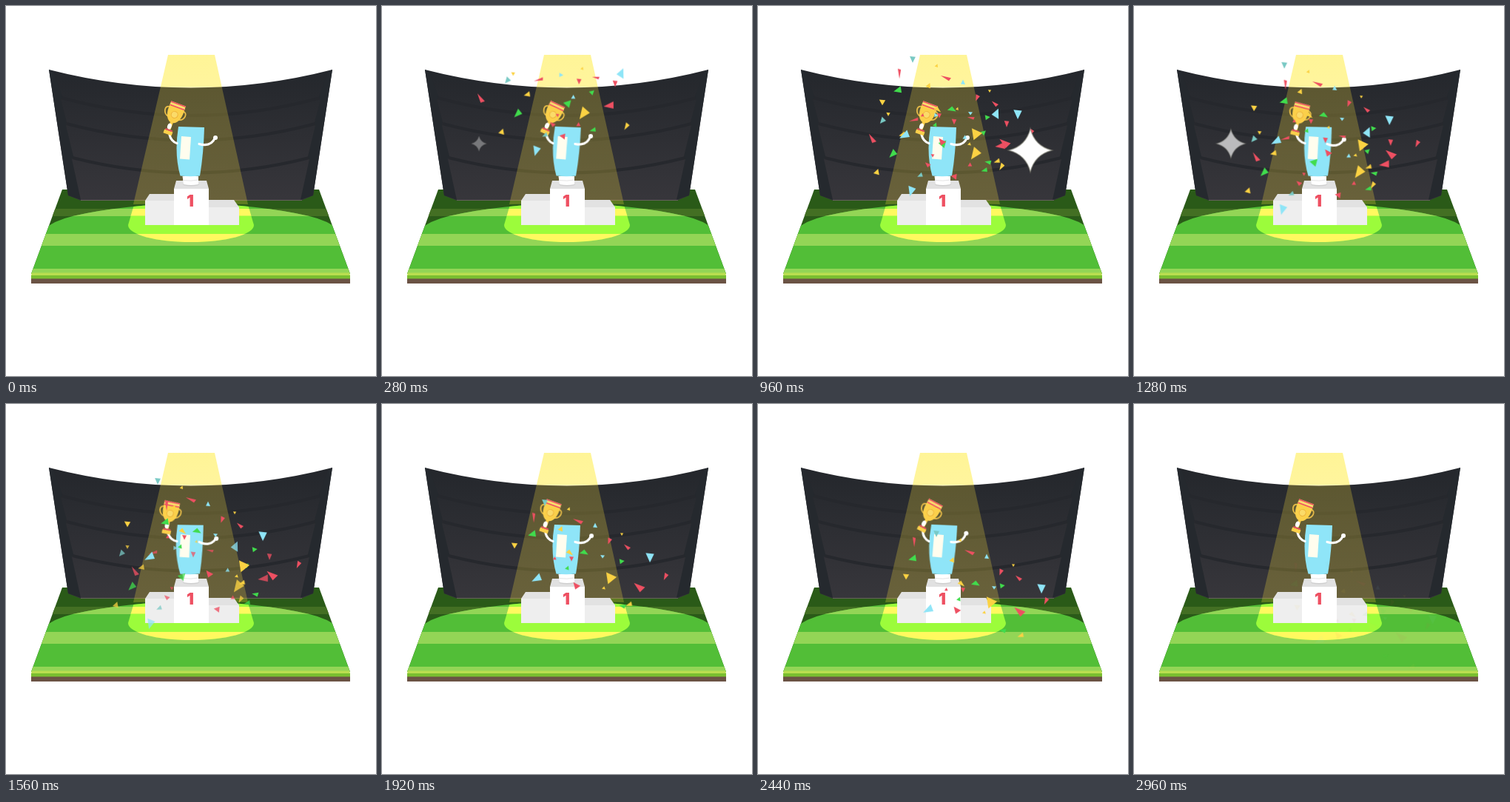
These frames come from a looping animation (500x500 px, 3000 ms). An HTML page without scripts:

```html
<!DOCTYPE html>
<html lang="en">
<head>
<meta charset="utf-8">
<title>Winner's podium</title>
<style>
html, body { margin: 0; width: 100%; height: 100%; overflow: hidden; background: #fff; }
svg { display: block; width: 100%; height: 100%; }
.r { fill: #ee5062; }
.y { fill: #fbd243; }
.g { fill: #41dc4d; }
.b { fill: #8fe5f7; }
.t { fill: #79c9c4; }

.sway { animation: 3s ease-in-out infinite; }
.body { animation-name: lean; transform-origin: 249px 232px; }
.left { animation-name: wave; transform-origin: 231px 186px; }
.right { animation-name: lift; transform-origin: 261px 187px; }
@keyframes lean {
  0%, 33.3%, 66.7%, 100% { transform: none; }
  16.7%, 83.3% { transform: rotate(1.1deg); }
  50% { transform: rotate(-1.1deg); }
}
@keyframes wave {
  0%, 33.3%, 66.7%, 100% { transform: none; }
  16.7%, 83.3% { transform: rotate(8deg); }
  50% { transform: rotate(-9deg); }
}
@keyframes lift {
  0%, 33.3%, 66.7%, 100% { transform: none; }
  16.7%, 83.3% { transform: rotate(-9deg); }
  50% { transform: rotate(10deg); }
}

/* confetti: pop out of the middle, then drift down in two currents */
.burst { animation: 3s linear infinite; transform-origin: 250px 175px; }
.a1 { animation-name: a1; }
.b1 { animation-name: b1; }
.a2 { animation-name: a2; }
.b2 { animation-name: b2; }
@keyframes a1 {
  0%, 1% { transform: scale(0); opacity: 1; animation-timing-function: ease-out; }
  7% { transform: translate(-10px, -28px); }
  18.67% { transform: none; }
  32% { transform: translate(13px, 32px); }
  48% { opacity: 1; }
  52% { transform: translate(33px, 79px); opacity: .8; }
  62%, 100% { transform: translate(44px, 103px); opacity: 0; }
}
@keyframes b1 {
  0%, 1% { transform: scale(0); opacity: 1; animation-timing-function: ease-out; }
  7% { transform: translate(4px, -28px); }
  18.67% { transform: none; }
  32% { transform: translate(2px, 32px); }
  48% { opacity: 1; }
  52% { transform: translate(-10px, 79px); opacity: .75; }
  62%, 100% { transform: translate(-16px, 103px); opacity: 0; }
}
@keyframes a2 {
  0%, 20% { transform: translate(0, -20px) scale(0); animation-timing-function: ease-out; }
  32% { transform: translate(-11px, -61px); }
  37% { transform: translate(-18px, -68px); }
  52% { transform: translate(-15px, -29px); }
  64% { transform: none; }
  81.33% { transform: translate(21px, 42px); }
  85% { opacity: 1; }
  98.67% { opacity: .06; }
  100% { transform: translate(43px, 87px); opacity: 0; }
}
@keyframes b2 {
  0%, 20% { transform: translate(0, -20px) scale(0); animation-timing-function: ease-out; }
  32% { transform: translate(-14px, -62px); }
  37% { transform: translate(-8px, -66px); }
  52% { transform: translate(12px, -16px); }
  64% { transform: none; }
  81.33% { transform: translate(6px, 33px); }
  85% { opacity: 1; }
  98.67% { opacity: .06; }
  100% { transform: translate(14px, 70px); opacity: 0; }
}

.star { fill: #fff; stroke: #8a8a7c; stroke-opacity: .55; stroke-width: 1.5; animation: 3s ease-in-out infinite; }
.east { animation-name: east; }
.west { animation-name: west; }
@keyframes east {
  0%, .7%, 7.3%, 28.7%, 35.3%, 56.7%, 63.3%, 84.7%, 91.3%, 100% { transform: scale(0); opacity: 0; }
  4%, 32%, 60%, 88% { transform: none; opacity: 1; }
}
@keyframes west {
  0%, 8%, 14.6%, 40.7%, 47.3%, 74.4%, 81%, 100% { transform: scale(0); opacity: 0; }
  11.3%, 44%, 77.7% { transform: none; opacity: 1; }
}
</style>
</head>
<body>
<svg viewBox="0 0 500 500">
<defs>
  <path id="tri" d="M-6-5 6-4 0 6z"/>
  <path id="spark" d="M0-29Q6-6 29 0 6 6 0 29-6 6-29 0-6-6 0-29z"/>
  <linearGradient id="wall" x2="0" y2="1">
    <stop stop-color="#24272c"/><stop offset="1" stop-color="#37363b"/>
  </linearGradient>
  <linearGradient id="beam" gradientUnits="userSpaceOnUse" x1="0" y1="66" x2="0" y2="266">
    <stop stop-color="#ffeb3b" stop-opacity=".53"/>
    <stop offset=".217" stop-color="#ffeb3b" stop-opacity=".5"/>
    <stop offset=".218" stop-color="#ffe33b" stop-opacity=".25"/>
    <stop offset="1" stop-color="#ffe33b" stop-opacity=".25"/>
  </linearGradient>
  <clipPath id="field"><path d="M76 248H423L465 362H34z"/></clipPath>
  <clipPath id="lit"><path d="M0 375V303H50Q64 290 90 284 160 268 250 267 340 268 410 284 436 290 450 303H500V375z"/></clipPath>
  <clipPath id="pool"><path d="M175 262H325L335 296C335 309 297 319 250 319S165 309 165 296z"/></clipPath>
</defs>

<g clip-path="url(#field)">
  <path fill="#2a5a18" d="M0 248H500V362H0z"/>
  <path fill="#436f23" d="M0 274H500V284H0z"/>
  <g clip-path="url(#lit)">
    <path fill="#52be37" d="M0 260H500V362H0z"/>
    <path fill="#93d556" d="M0 274H500V284H0zM0 308H500V324H0zM0 355H500V362H0z"/>
    <g clip-path="url(#pool)">
      <path fill="#9cfc3b" d="M150 260H350V320H150z"/>
      <path fill="#fff95f" d="M150 274H350V283.500H150zM150 308H350V320H150z"/>
    </g>
  </g>
</g>
<path fill="#bade50" d="M35 360.500H464L465 364H34z"/>
<path fill="#7abf30" d="M34 364H465V369H34z"/>
<path fill="#6b5344" d="M34 368.500H465V375H34z"/>

<path fill="url(#wall)" d="M58 86Q250 135 441 86L415 256 400 262.500H100L84 256z"/>
<g fill="none" stroke="#26282d" stroke-width="4">
  <path d="M75 124Q250 172 425 124"/>
  <path d="M82 159Q250 204 418 159"/>
  <path d="M90 205Q250 246 410 205"/>
</g>
<path id="side" fill="#25292e" d="M58 86 64 89 76 122 74 127 82 157 81 162 91 203 89 207 101 262 84 256z"/>
<use href="#side" transform="matrix(-1 0 0 1 499 0)"/>
<path fill="none" stroke="#66625c" d="M101 262.500H400"/>
<path fill="url(#beam)" d="M219 66H282L327 268Q250 266 172 268z"/>

<path fill="#e2e2e2" d="M194 254H228V263H188zM274 262H308L315 272H274z"/>
<path fill="#eee" d="M188 263H228V296H188zM273 272H315V296H273z"/>
<path fill="#e1e1e1" d="M230 236H271L274 247H227z"/>
<path fill="#fff" d="M227 247H274V296H227z"/>
<text x="249" y="271" text-anchor="middle" font-family="Inter, Arial, sans-serif" font-weight="900" font-size="22" fill="#ee5062">1</text>
<ellipse cx="250" cy="241" rx="11" ry="2.500" fill="#cfcfcf"/>
<path fill="#fff" d="M238.500 230H260L260 241Q250 243 240 241z"/>
<path fill="none" stroke="#e4e4e4" d="M239 235.500Q250 237 260 235"/>

<g class="sway body">
  <path fill="#8fe5f8" d="M233 163 268 164Q267 200 262 229.500 249 231 235.500 229.500 227 200 233 163z"/>
  <path fill="#fffdee" d="M237 176 250 177 248 207.500 235 206.500z"/>
</g>
<g class="sway left">
  <path fill="none" stroke="#fff" stroke-width="3.200" stroke-linecap="round" d="M231 185.500Q223 183 221 174"/>
  <g transform="translate(228 146) rotate(20)">
    <g fill="none" stroke="#e9bd48" stroke-width="1.800">
      <path d="M-9-7C-17-8-16 4-7 6M9-7C17-8 16 4 7 6"/>
    </g>
    <path fill="#fbd04b" d="M-10.500-11H10.500Q12 7 3 12H-3Q-12 7-10.500-11zM-2 11H2V22H-2zM-6 24H6V29H-6z"/>
    <path fill="#fbdc6d" d="M-10.500-15H10.500V-10H-10.500z"/>
    <path fill="#ee5062" d="M-10.500-15H10.500V-13.500H-10.500zM-10.500-10.500H10.500V-9H-10.500zM-5 22H5V24H-5z"/>
    <circle cy="1" r="4.500" fill="#fbdb69" stroke="#eeb33c"/>
    <ellipse cx="-1" cy="18" rx="2.800" ry="4" fill="#fff"/>
  </g>
</g>
<g class="sway right">
  <path fill="none" stroke="#fff" stroke-width="3.200" stroke-linecap="round" d="M261 186.500Q277 191 282.500 178"/>
  <circle cx="283" cy="178" r="3" fill="#fff"/>
</g>

<g class="burst a1">
  <g class="r">
    <use href="#tri" transform="translate(141 147) rotate(148) scale(.5 1.300)"/>
    <use href="#tri" transform="translate(315 157) rotate(82) scale(.8 1.300)"/>
    <use href="#tri" transform="translate(323 127) scale(.55 .8)"/>
    <use href="#tri" transform="translate(253 199) rotate(-25) scale(.7)"/>
    <use href="#tri" transform="translate(273 183) rotate(60) scale(.5)"/>
  </g>
  <use class="y" href="#tri" transform="translate(280 168) rotate(35) scale(1.100 1.500)"/>
  <g class="g">
    <use href="#tri" transform="translate(293 190) rotate(75) scale(.5 .8)"/>
    <use href="#tri" transform="translate(291 139) rotate(105) scale(.6)"/>
  </g>
  <use class="b" href="#tri" transform="translate(266 146) rotate(60) scale(.5)"/>
</g>

<g class="burst b1">
  <g class="r">
    <use href="#tri" transform="translate(209 122) rotate(75) scale(.35 1.200)"/>
    <use href="#tri" transform="translate(263 124) scale(.55 .7)"/>
    <use href="#tri" transform="translate(286 119) rotate(100) scale(.3 .9)"/>
    <use href="#tri" transform="translate(227 182) rotate(130) scale(.5 .7)"/>
    <use href="#tri" transform="translate(234 170) scale(.4)"/>
  </g>
  <g class="y">
    <use href="#tri" transform="translate(174 114) scale(.45)"/>
    <use href="#tri" transform="translate(193 142) rotate(75) scale(.6 .8)"/>
    <use href="#tri" transform="translate(158 193) rotate(75) scale(.7)"/>
    <use href="#tri" transform="translate(327 185) rotate(30) scale(.5 .9)"/>
    <use href="#tri" transform="translate(267 107) rotate(75) scale(.35)"/>
  </g>
  <g class="g">
    <use href="#tri" transform="translate(180 168) rotate(45) scale(.75 1.100)"/>
    <use href="#tri" transform="translate(247 154) rotate(100) scale(.9)"/>
  </g>
  <g class="b">
    <use href="#tri" transform="translate(319 114) rotate(85) scale(1.200 .9)"/>
    <use href="#tri" transform="translate(205 218) rotate(15) scale(.9 1.200)"/>
    <use href="#tri" transform="translate(238 115) rotate(150) scale(.5)"/>
  </g>
  <g class="t">
    <use href="#tri" transform="translate(166 123) rotate(40) scale(.65 .8)"/>
    <use href="#tri" transform="translate(217 197) rotate(65) scale(.5 .7)"/>
  </g>
</g>

<g class="burst a2">
  <g class="r">
    <use href="#tri" transform="translate(265 158) rotate(112) scale(.4 1.300)"/>
    <use href="#tri" transform="translate(307 185) rotate(20) scale(.5 .8)"/>
    <use href="#tri" transform="translate(331 193) rotate(130) scale(.4 .9)"/>
    <use href="#tri" transform="translate(256 209) scale(.5 .6)"/>
    <use href="#tri" transform="translate(233 209) rotate(60) scale(.4)"/>
  </g>
  <g class="y">
    <use href="#tri" transform="translate(179 191) scale(.7)"/>
    <use href="#tri" transform="translate(254 201) rotate(-50) scale(.5 .9)"/>
    <use href="#tri" transform="translate(334 271) rotate(70) scale(.5 .8)"/>
    <use href="#tri" transform="translate(241 169) rotate(80) scale(.6)"/>
    <use href="#tri" transform="translate(324 176) scale(.35)"/>
    <use href="#tri" transform="translate(252 142) rotate(80) scale(.4)"/>
  </g>
  <g class="g">
    <use href="#tri" transform="translate(273 200) rotate(185) scale(1 .6)"/>
    <use href="#tri" transform="translate(250 222) rotate(80) scale(.5)"/>
  </g>
  <g class="b">
    <use href="#tri" transform="translate(288 164) rotate(180) scale(.5 .6)"/>
    <use href="#tri" transform="translate(362 207) scale(.95 1.150)"/>
    <use href="#tri" transform="translate(298 206) scale(.5 .4)"/>
    <use href="#tri" transform="translate(209 236) rotate(62) scale(.85 1.300)"/>
  </g>
  <use class="t" href="#tri" transform="translate(220 133) scale(.65 .8)"/>
</g>

<g class="burst b2">
  <g class="r">
    <use href="#tri" transform="translate(205 153) scale(.35 1.250)"/>
    <use href="#tri" transform="translate(383 233) rotate(25) scale(.5 .9)"/>
    <use href="#tri" transform="translate(347 247) rotate(128) scale(.8 1.400)"/>
    <use href="#tri" transform="translate(262 245) rotate(140) scale(.7 .9)"/>
  </g>
  <g class="y">
    <use href="#tri" transform="translate(308 236) rotate(20) scale(1.300)"/>
    <use href="#tri" transform="translate(300 249) rotate(-50) scale(.4)"/>
  </g>
  <g class="g">
    <use href="#tri" transform="translate(203 176) rotate(75) scale(.75 1)"/>
    <use href="#tri" transform="translate(323 212) rotate(140) scale(.6)"/>
    <use href="#tri" transform="translate(325 273) rotate(100) scale(.5 .8)"/>
  </g>
</g>

<g transform="translate(368 195)"><use class="star east" href="#spark"/></g>
<g transform="translate(131 186)"><use class="star west" href="#spark"/></g>
</svg>
</body>
</html>
```
